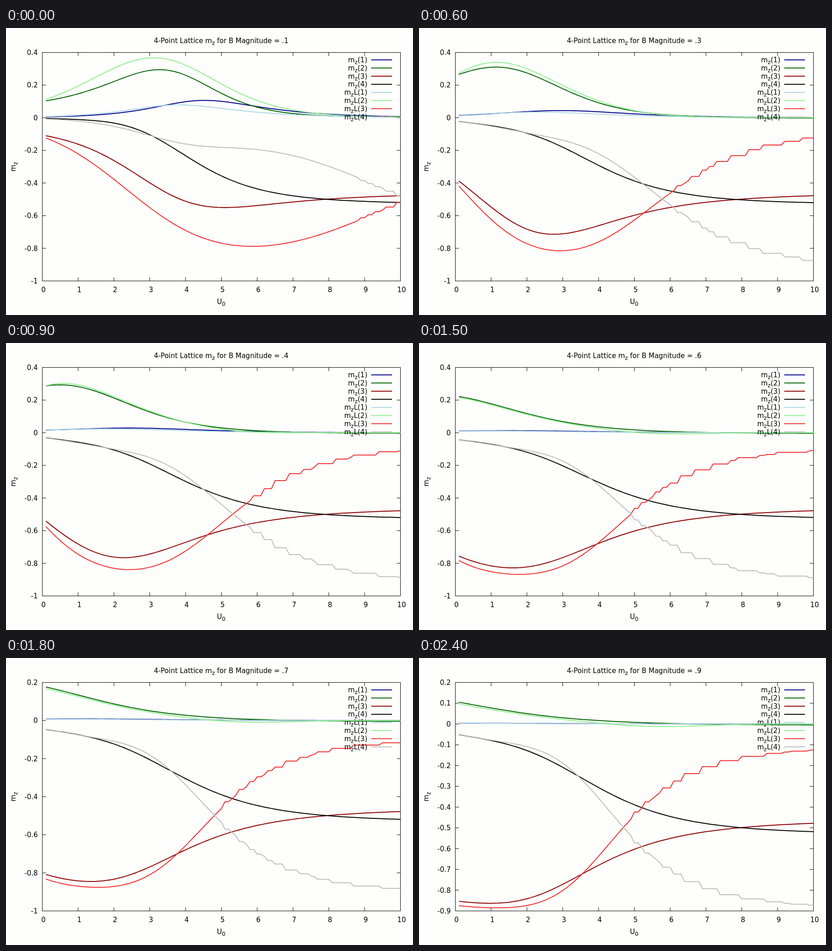
These frames come from a looping animation (891 by 628 pixels, 2700 ms). An HTML page:

```html
<!DOCTYPE html>
<html lang="en">
<head>
<meta charset="utf-8">
<title>4-Point Lattice</title>
<style>
html, body { margin: 0; width: 100%; height: 100%; overflow: hidden; background: #fefefc; }
svg { display: block; font: 15px "DejaVu Sans", sans-serif; }
path { fill: none; stroke-width: 2; stroke-linejoin: round; }
.axis { stroke: #000; stroke-width: 1; }
</style>
</head>
<body>
<svg id="plot" width="891" height="628" viewBox="0 0 891 628"></svg>
<script>
const STEP = 300, LEFT = 79.5, RIGHT = 863.5, TOP = 53.5, BOTTOM = 553.5;
const COLORS = ['#00008b', '#006400', '#8b0000', '#000', '#add8e6', '#90ee90', '#f03232', '#bebebe'];

const { exp, log, floor, min } = Math;
const hill = (x, half, n) => 1 / (1 + (half / x) ** n);
const logistic = x => 1 / (1 + exp(-x));
const mix = (from, to, t) => from + (to - from) * t;

function random(seed) {
  return () => (seed = (seed * 16807) % 2147483647) / 2147483647;
}

// Replaces the samples from start on by plateaus that grow wider.
function plateaus(ys, start, rand) {
  const out = ys.slice();
  for (let i = start; i < ys.length;) {
    const width = 1 + floor(rand() * (2 + (i - start) / 6));
    out.fill(ys[min(i + (width >> 1), ys.length - 1)], i, i + width);
    i += width;
  }
  return out;
}

// The eight curves for field strength b, sampled at U = 0.1 to 10.
function curves(b) {
  const sample = f => Array.from({ length: 100 }, (_, i) => f((i + 1) / 10));
  const bell = (height, mid) => sample(u =>
    2 * height / (exp(1.1 * exp(-2 * b) * (mid - u)) + exp(.6 * (u - mid))));

  // Shared by the exact and the approximate (L) curves
  const onset = 6.7 * b - 2.14 - .05 / b;
  const height = .84 * (1 - hill(b, .6, 2.6));

  const rise = u => logistic(onset + (.9 - exp(-7 * b)) * u + .13 * exp(-3.5 * b) * u * u);
  const m1 = bell(.16 * exp(-4.3 * b), 1.5 - 1.2 * log(b));
  const m2 = sample(u =>
    height * rise(u) * logistic((.5 + .7 * exp(-2 * b)) * (-1.65 * log(b) - .12 - u))
    + (.0012 / b - .007) * hill(u, 6, 4));
  const m3 = sample(u => -rise(u) * mix(.87 + .004 * u, .457, hill(u, 4.1, 3.4)));
  const m4 = sample(u => -mix(.06 * hill(b, .42, 2) + .028 * hill(b, .13, 4) * u, .53,
    hill(u, 4.35 + .2 * b, 3.5 + 1.6 * exp(-5 * b))));

  const riseL = u => logistic(onset + .07 + (1.3 - .75 * exp(-4 * b)) * u);
  const drop = 4.25 + .4 * b ** -1.2;
  const L1 = bell(.115 * exp(-4 * b), 1 - 1.1 * log(b));
  const L2 = sample(u =>
    height * riseL(u) * logistic((.55 + .45 * exp(-2 * b)) * (-1.9 * log(b) - .4 - u))
    - .018 * hill(b, .25, 4) * exp(-(((u - 5.5) / 2) ** 2)));
  const smooth = sample(u => -riseL(u) * mix(.89, .03 + .08 * b, hill(u, drop, 4.6)));
  const L3 = plateaus(smooth, floor(10 * min(drop, 8.8)), random(floor(b * 1e6)));
  const share = sample(u =>
    logistic(-5.7 + 9.1 * b - 3.6 * b * b + (1.05 + 2 * b - 2.05 * b * b) * u));
  const L4 = L3.map((v, i) => (-.998 - v) * share[i]);

  return [m1, m2, m3, m4, L1, L2, L3, L4];
}

// "_x" sets x as a subscript.
function text(x, y, s, anchor = 'middle', more = '') {
  const body = String(s).replace(/_(.)(.*)/,
    '<tspan dy="4" font-size="12">$1</tspan><tspan dy="-4">$2</tspan>');
  return `<text x="${x}" y="${y}" text-anchor="${anchor}" ${more}>${body}</text>`;
}

const px = u => LEFT + u * (RIGHT - LEFT) / 10;

// b, hi and lo count tenths.
function draw(b) {
  const hi = b < 7 ? 4 : 2, lo = b === 2 ? -8 : b === 9 ? -9 : -10;
  const py = v => TOP + (hi - v) * (BOTTOM - TOP) / (hi - lo);
  let axis = `M${LEFT} ${TOP}H${RIGHT}V${BOTTOM}H${LEFT}Z`, out = '';
  for (let v = hi; v >= lo; v -= b === 9 ? 1 : 2) {
    axis += `M${LEFT} ${py(v)}h8M${RIGHT} ${py(v)}h-8`;
    out += text(69.5, py(v) + 5.5, v / 10, 'end');
  }
  for (let u = 0; u <= 10; u++) {
    axis += `M${px(u)} ${TOP}v8M${px(u)} ${BOTTOM}v-8`;
    out += text(px(u) + 2.5, 577.5, u);
  }
  out += text(471, 33, `4-Point Lattice m_z for B Magnitude = .${b}`);
  out += text(471, 604, 'U_0');
  out += text(0, 0, 'm_z', 'middle', 'transform="translate(21 303.5) rotate(-90)"');
  out += `<path class="axis" d="${axis}"/>`;
  curves(b / 10).forEach((ys, k) => {
    const y = 69.8 + 17.8 * k;
    const line = ys.map((v, i) => `${px((i + 1) / 10).toFixed(2)} ${py(v * 10).toFixed(2)}`).join('L');
    out += text(791, y + 5.2, `m_z${k > 3 ? 'L' : ''}(${k % 4 + 1})`, 'end');
    out += `<path stroke="${COLORS[k]}" d="M799.5 ${y}H845M${line}"/>`;
  });
  return out;
}

const plot = document.getElementById('plot');
const views = Array.from({ length: 9 }, (_, i) => draw(i + 1));
let shown = -1;
function tick() {
  const i = floor(performance.now() / STEP) % views.length;
  if (i !== shown) plot.innerHTML = views[shown = i];
  requestAnimationFrame(tick);
}
tick();
</script>
</body>
</html>
```
